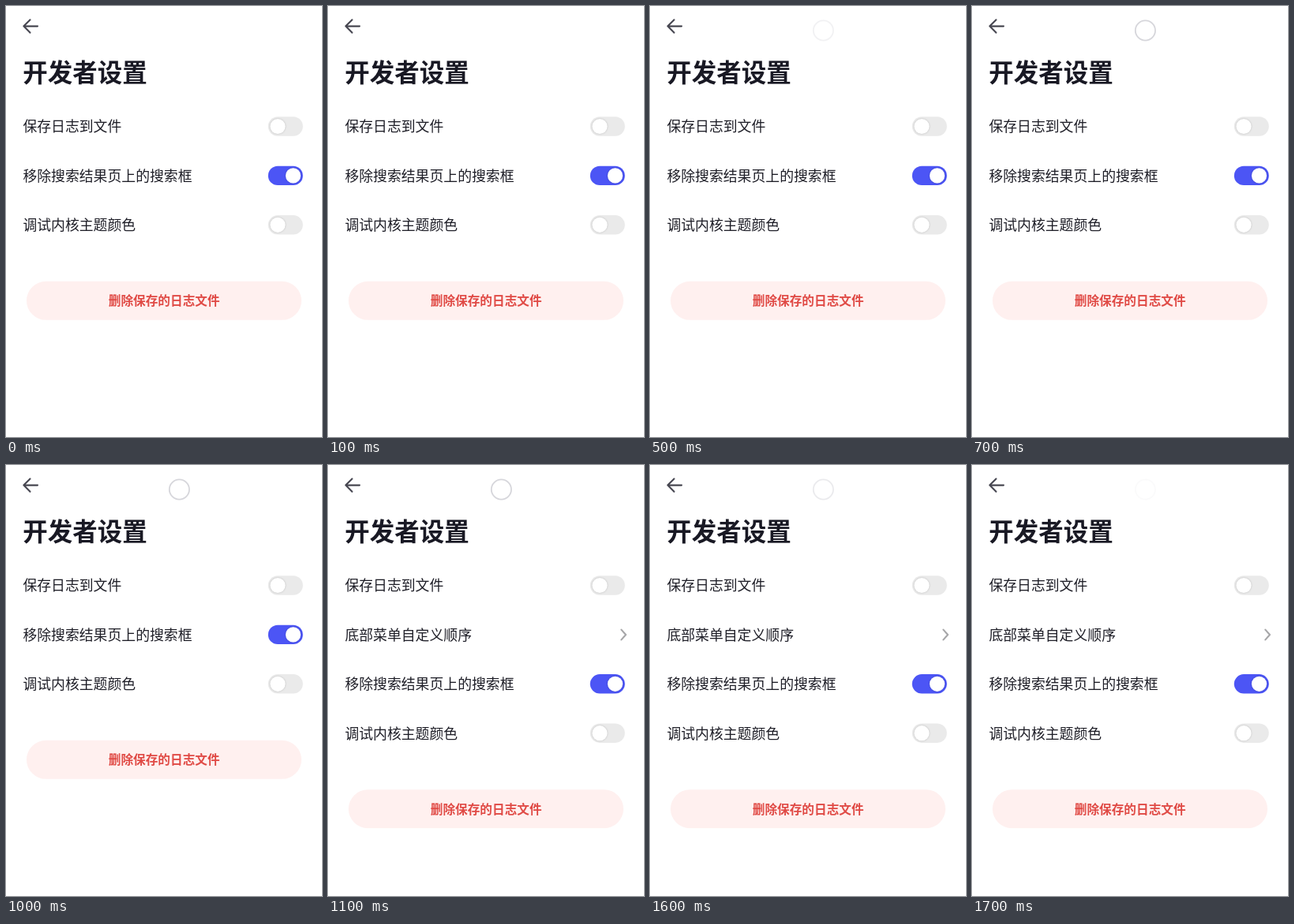
Recreate the animation shown at these times as an HTML page. Size 400x546 px, loop 2000 ms.

```html
<!DOCTYPE html>
<html lang="zh-CN">
<head>
<meta charset="utf-8">
<title>开发者设置</title>
<style>
  html, body { margin: 0; width: 100%; height: 100%; overflow: hidden; background: #fff; }
  svg { display: block; width: 400px; height: 546px; }
  text { font: 17.85px "Noto Sans CJK SC", "Noto Sans CJK", "Noto Sans", sans-serif; fill: #1e1e27; }
  .title { font-size: 31.5px; font-weight: 700; fill: #191924; }
  .delete { font-size: 15.65px; font-weight: 700; fill: #e04a45; text-anchor: middle; }
  .line { fill: none; stroke: #484852; stroke-width: 2.1; stroke-linecap: round; stroke-linejoin: round; }
  .chevron { stroke: #a6a6a8; }
  .off { fill: #eaeaea; }
  .on { fill: #4c55f5; }
  .knob { fill: #fff; filter: drop-shadow(0 .6px .8px #0003); }
  .touch { fill: #fff; stroke: #d6d6db; stroke-width: 1.8; animation: touch 2s step-end infinite; }
  .lower { animation: shift 2s step-end infinite; }
  .extra { animation: reveal 2s step-end infinite; }
  @keyframes touch {
    0% { opacity: 0; }
    25% { opacity: .33; }
    30% { opacity: .7; }
    35% { opacity: 1; }
    80% { opacity: .5; }
    85%, 100% { opacity: .1; }
  }
  @keyframes shift {
    0% { transform: none; }
    55%, 100% { transform: translateY(62.4px); }
  }
  @keyframes reveal {
    0% { visibility: hidden; }
    55%, 100% { visibility: visible; }
  }
</style>
</head>
<body>
<svg viewBox="0 0 400 546">
  <defs>
    <rect id="track" x="331.8" y="140.3" width="44" height="24.4" rx="12.2"/>
    <g id="off">
      <use href="#track" class="off"/>
      <circle class="knob" cx="344" cy="152.5" r="9.6"/>
    </g>
    <g id="on">
      <use href="#track" class="on"/>
      <circle class="knob" cx="363.5" cy="152.5" r="9.6"/>
    </g>
  </defs>

  <path class="line" d="M40 25.6H22.6M30.5 17.4L22.4 25.6L30.5 33.8"/>
  <text class="title" x="21.3" y="96">开发者设置</text>

  <text x="21.4" y="159.4">保存日志到文件</text>
  <use href="#off"/>

  <g class="extra">
    <text x="21.4" y="221.8">底部菜单自定义顺序</text>
    <path class="line chevron" d="M371.3 208.6L377 215L371.3 221.4"/>
  </g>

  <g class="lower">
    <text x="21.4" y="221.8">移除搜索结果页上的搜索框</text>
    <use href="#on" y="62.4"/>
    <text x="21.4" y="284.2">调试内核主题颜色</text>
    <use href="#off" y="124.8"/>
    <rect x="26" y="348.8" width="348" height="49" rx="24.5" fill="#fff0ef"/>
    <text class="delete" x="200.2" y="379.4">删除保存的日志文件</text>
  </g>

  <circle class="touch" cx="219.4" cy="31" r="12.6"/>
</svg>
</body>
</html>
```
